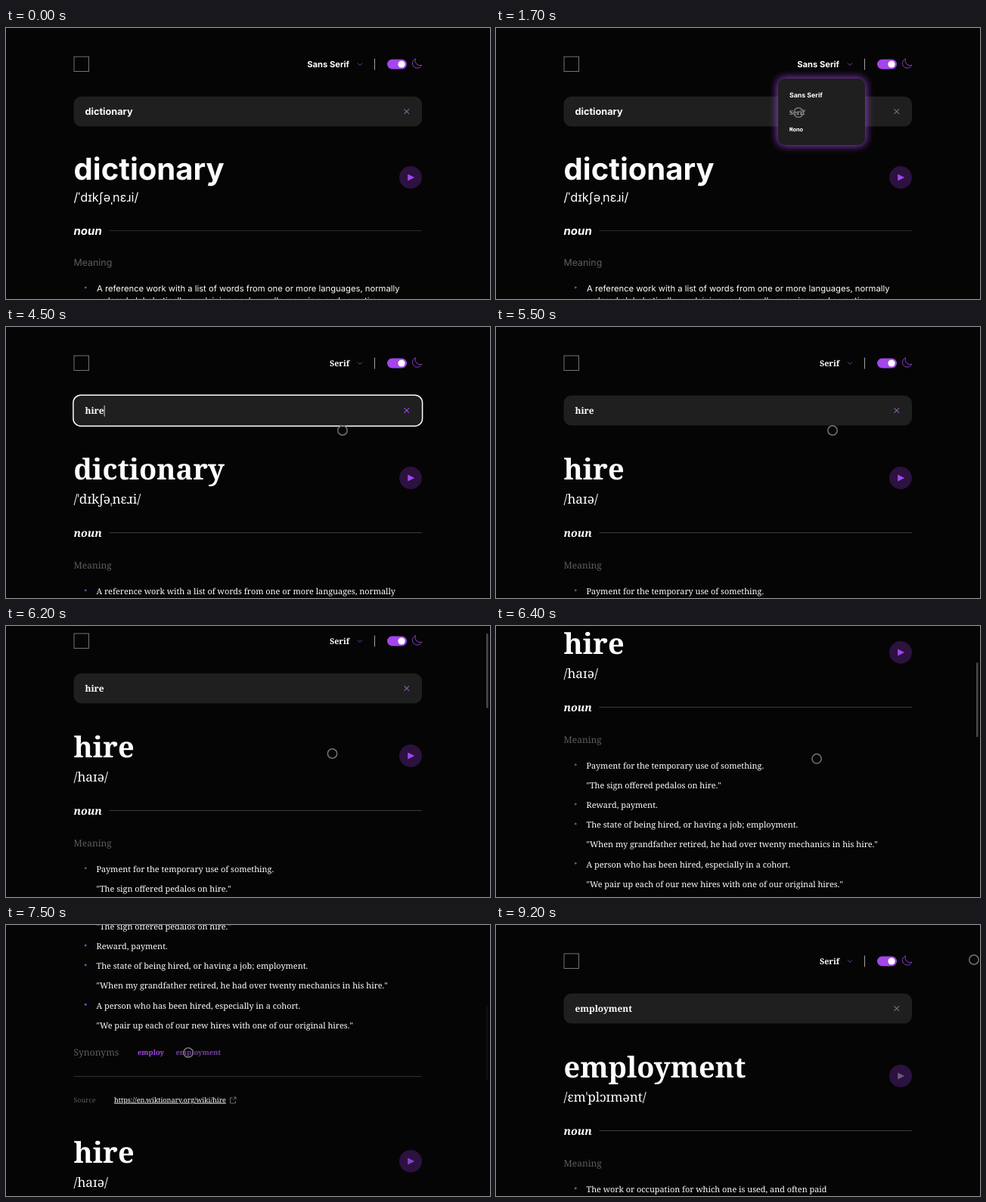
An HTML page for the animation above (9300 ms loop, 640 by 359 pixels).

```html
<!DOCTYPE html>
<html lang="en">
<head>
<meta charset="utf-8">
<title>Dictionary</title>
<style>
  html, body { margin: 0; width: 100%; height: 100%; overflow: hidden; background: #050505; }
  svg { display: block; width: 100vw; height: 100vh; }
  text { fill: #fff; text-rendering: geometricPrecision; white-space: pre; }
  .sans { font-family: Inter, sans-serif; }
  .serif { font-family: "Noto Serif", serif; }
  .mono { font-family: "Noto Sans Mono", monospace; }
  .b { font-weight: 700; }
  .i { font-style: italic; }
  .grey { fill: #5e5e5e; }
  .u { text-decoration: underline; }
</style>
</head>
<body>
<svg id="stage" viewBox="0 0 640 359">
  <defs>
    <filter id="glow" x="-30%" y="-40%" width="160%" height="180%"><feGaussianBlur stdDeviation="5.5"/></filter>
  </defs>
  <rect width="640" height="359" fill="#050505"/>
  <g id="page">
    <rect x="90" y="38" width="19.5" height="19.5" fill="none" stroke="#737373"/>
    <text id="label" class="b" x="454" y="52" text-anchor="end"></text>
    <path d="M465 46.5l3 3 3-3" fill="none" stroke="#7b3bad"/>
    <path d="M487.5 40.5v15" stroke="#a0a0a0"/>
    <rect x="504" y="41.5" width="26" height="13" rx="6.5" fill="#a445ed"/>
    <circle cx="523" cy="48" r="4.6" fill="#fff"/>
    <path d="M541.5 40.8a6.4 6.4 0 1 0 8.3 8.4a6.4 6.4 0 0 1 -8.3 -8.4z" fill="none" stroke="#8a3cc4"/>
    <rect id="box" x="89.5" y="90.7" width="460.5" height="39.8" rx="10" fill="#1f1f1f"/>
    <rect id="ring" x="88.9" y="90.2" width="461.7" height="41" rx="10" fill="none" stroke="#fff" stroke-width="1.5"/>
    <text id="query" class="b" x="104.5" y="115"></text>
    <path id="caret" d="M0 104v14.5" stroke="#ddd"/>
    <path id="clear" d="M526.5 107.3l6.6 6.6m0-6.6l-6.6 6.6" stroke-width="1.1"/>
    <g id="content"></g>
  </g>
  <g id="menu">
    <rect x="372" y="66" width="117" height="90" rx="10" fill="#a445ed" opacity=".9" filter="url(#glow)"/>
    <rect x="373" y="67" width="115" height="88" rx="9" fill="#1f1f1f"/>
    <text class="sans b" x="388" y="92" font-size="8.8">Sans Serif</text>
    <text class="serif b" x="388" y="115" font-size="8.4" style="fill:#aaa">Serif</text>
    <text class="mono b" x="388" y="137" font-size="7.5">Mono</text>
  </g>
  <rect id="bar" x="635" width="2.6" height="99" rx="1.3" fill="#484848"/>
  <circle id="cursor" r="6.2" fill="none" stroke="#747474" stroke-width="1.5"/>
</svg>
<script>
const LOOP = 9300, STEP = 100;
const $ = id => document.getElementById(id);
const set = (id, attrs) => { for (const k in attrs) $(id).setAttribute(k, attrs[k]); };

const words = {
  dictionary: {
    ipa: '/ˈdɪkʃəˌnɛɹi/',
    lines: ['*A reference work with a list of words from one or more languages, normally']
  },
  hire: {
    ipa: '/haɪə/',
    lines: [
      '*Payment for the temporary use of something.',
      '"The sign offered pedalos on hire."',
      '*Reward, payment.',
      '*The state of being hired, or having a job; employment.',
      '"When my grandfather retired, he had over twenty mechanics in his hire."',
      '*A person who has been hired, especially in a cohort.',
      '"We pair up each of our new hires with one of our original hires."'
    ]
  },
  employment: {
    ipa: '/ɛmˈplɔɪmənt/',
    lines: ['*The work or occupation for which one is used, and often paid']
  }
};

const looks = {
  sans: { title: 40.1, ipa: 16.3, noun: 15, head: 12.4, body: 11.25, label: 11.2, query: 12.7,
          y: [201, 230, 274, 315, 349], rule: 268.5, ruleColor: '#292929', play: 198 },
  serif: { title: 37.9, ipa: 17.2, noun: 14.2, head: 12, body: 10.88, label: 10.7, query: 11.9,
           y: [202, 233.5, 277.5, 320, 354], rule: 272.5, ruleColor: '#3c3c3c', play: 200 }
};

const text = (x, y, size, cls, str, extra = '') =>
  `<text class="${cls}" x="${x}" y="${y}" font-size="${size}" ${extra}>${str}</text>`;
const line = (x, y, color) => `<path d="M${x} ${y}H550" stroke="${color}"/>`;

function heading(word, font, dy, tint) {
  const s = looks[font], py = s.play + dy;
  return text(89.5, s.y[0] + dy, s.title, font + ' b', word) +
    text(89.5, s.y[1] + dy, s.ipa, font, words[word].ipa) +
    `<circle cx="535" cy="${py}" r="15" fill="#2b123f"/>` +
    `<path d="M531.2 ${py - 4.5}l9 4.5-9 4.5z" fill="${tint}"/>`;
}

function footer(lit) {
  const fill = c => `style="fill:${c}"`;
  return text(89.5, 547, 12.2, 'serif grey', 'Synonyms') +
    text(174, 546, 9.4, 'serif b', 'employ', fill(lit ? '#a445ed' : '#633f85')) +
    text(224.5, 546, 9.4, 'serif b', 'employment', fill(lit ? '#74429f' : '#633f85')) +
    line(89.5, 574.7, '#343434') +
    text(89.5, 608.7, 8.9, 'serif grey', 'Source') +
    text(143, 608.7, 9.1, 'serif u', 'https://en.wiktionary.org/wiki/hire') +
    '<path d="M299.5 603h-3v7h7v-3M300.5 606l3.5-4M301 602h3v3" fill="none" stroke="#777" stroke-width=".9"/>';
}

function article(word, font, lit) {
  const s = looks[font], last = word === 'employment';
  const dot = last ? '#666' : lit ? '#8a40c6' : '#6446a0';
  let out = heading(word, font, 0, last ? '#6f5a7c' : '#a445ed') +
    text(89.5, s.y[2], s.noun, font + ' b i', 'noun') +
    line(136.5, s.rule, s.ruleColor) +
    text(89.5, s.y[3], s.head, font + ' grey', 'Meaning');
  words[word].lines.forEach((str, n) => {
    const y = s.y[4] + n * 26.1;
    if (str[0] === '*') out += `<circle cx="105.2" cy="${y - 5.2}" r="1.5" fill="${dot}"/>`;
    out += text(font === 'sans' ? 120 : 119.5, y, s.body, font, str.replace('*', ''));
  });
  if (word === 'dictionary')
    out += text(120, s.y[4] + 16, s.body, font, "ordered alphabetically, explaining each word's meaning, and sometimes");
  if (word === 'hire') out += footer(lit) + heading('hire', font, 487, '#8f40cc');
  return out;
}

// Keys are [time, value, ...]; values are interpolated linearly.
function track(keys, t) {
  if (t <= keys[0][0]) return keys[0].slice(1);
  for (let n = 1; n < keys.length; n++) {
    const a = keys[n - 1], b = keys[n];
    if (t <= b[0]) return a.slice(1).map((v, k) => v + (b[k + 1] - v) * (t - a[0]) / (b[0] - a[0]));
  }
  return keys[keys.length - 1].slice(1);
}
const ramp = (t, from, to) => Math.min(1, Math.max(0, (t - from) / (to - from)));

const path = [
  [300, 604, 100], [500, 530, 72], [800, 448, 46], [1100, 448, 46], [1700, 400, 112],
  [2200, 400, 112], [2700, 550, 113], [2900, 530, 111], [3200, 530, 111], [3700, 445, 137],
  [5800, 445, 137], [6200, 431.5, 169], [6700, 413, 186], [6800, 413, 186],
  [7500, 241, 169], [8700, 241, 169], [9200, 632, 46]
];
const scrolling = [
  [6000, 0], [6100, 6], [6200, 28], [6300, 92], [6400, 165], [6500, 222], [6600, 256],
  [6700, 268.5], [6800, 273], [6900, 285], [7100, 335], [7300, 366], [7500, 374]
];

function queryAt(t) {
  if (t < 3300) return 'dictionary';
  if (t < 4200) return '';
  if (t < 7700) return 'hire'.slice(0, Math.floor((t - 4200) / 100) + 1);
  return 'employment';
}

let shown = '';
function draw(t) {
  const font = t < 2100 ? 'sans' : 'serif', s = looks[font];
  const word = t < 5000 ? 'dictionary' : t < 7700 ? 'hire' : 'employment';
  const lit = t >= 6900, key = word + font + lit;
  if (key !== shown) {
    $('content').innerHTML = article(word, font, lit);
    shown = key;
  }
  const fade = word === 'hire' ? ramp(t, 4800, 5500) : word === 'employment' ? ramp(t, 7500, 8000) : 1;
  set('content', { opacity: fade });

  const scroll = t < 7700 ? track(scrolling, t)[0] : 0;
  set('page', { transform: `translate(0 ${-scroll})` });

  $('label').textContent = font === 'sans' ? 'Sans Serif' : 'Serif';
  set('label', { class: font + ' b', 'font-size': s.label });

  const query = queryAt(t), focus = t >= 3300 && t < 4900;
  $('query').textContent = query;
  set('query', { class: font + ' b', 'font-size': s.query });
  set('ring', { opacity: focus ? 1 : 0 });
  const width = query ? $('query').getComputedTextLength() : 0;
  set('caret', { opacity: focus ? 1 : 0, transform: `translate(${105 + width} 0)` });
  set('clear', {
    opacity: query ? 1 : 0,
    stroke: word === 'employment' ? '#777' : focus ? '#a445ed' : '#8d5fa3'
  });

  set('menu', { opacity: t < 2000 ? ramp(t, 1100, 1400) : 1 - ramp(t, 1900, 2200) });

  const barTop = 2 + 0.28 * track(scrolling, t)[0];
  set('bar', { y: barTop, opacity: t < 6100 || t >= 8800 ? 0 : 1 - 0.85 * ramp(t, 7100, 7500) });

  const [x, y] = track(path, t);
  set('cursor', { cx: x, cy: y, opacity: t < 300 ? 0 : 1 });
}

const start = performance.now();
function tick() {
  const t = (performance.now() - start) % LOOP;
  draw(Math.floor(t / STEP) * STEP);
  requestAnimationFrame(tick);
}
tick();
</script>
</body>
</html>
```
